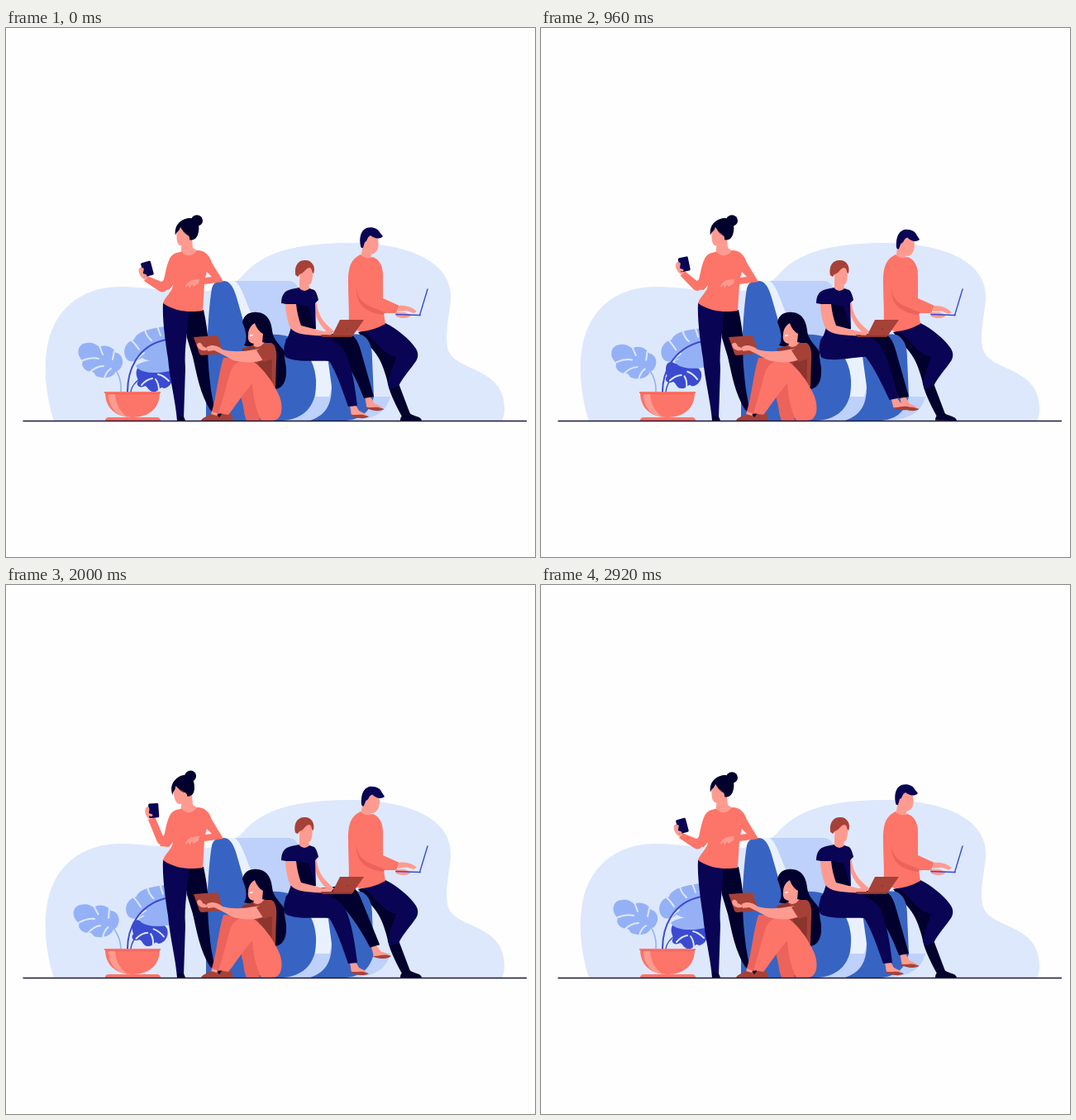
Write an HTML page with a canvas that moves like this. It is 640 by 640 pixels and loops after 2960 ms.

```html
<!DOCTYPE html>
<html lang="en">
<head>
<meta charset="utf-8">
<title>Friends with devices</title>
<style>
html, body { margin: 0; width: 100%; height: 100%; overflow: hidden; background: #fefefe; }
canvas { display: block; width: 100vw; height: 100vh; }
</style>
</head>
<body>
<canvas id="stage" width="640" height="640"></canvas>
<script>
const ctx = document.getElementById('stage').getContext('2d');
const LOOP = 2960, STEP = 40;
const C = {
  sky: '#dde8fc', pale: '#bdd1fa', mist: '#eaf1fe', blue: '#3764c2', leaf: '#95b1f6', vine: '#3b4bd0',
  navy: '#090453', dark: '#02002c', coral: '#fd7468', deep: '#ec635b', skin: '#fe9b90',
  brown: '#a64138', shade: '#8c352f', line: '#1a1638'
};

function fill(color, d) {
  ctx.fillStyle = color;
  ctx.fill(new Path2D(d));
}
function stroke(color, width, d) {
  ctx.strokeStyle = color;
  ctx.lineWidth = width;
  ctx.stroke(new Path2D(d));
}
function oval(color, x, y, rx, ry, deg = 0) {
  ctx.fillStyle = color;
  ctx.beginPath();
  ctx.ellipse(x, y, rx, ry, deg * Math.PI / 180, 0, 7);
  ctx.fill();
}
function turn(x, y, deg, draw) {
  ctx.save();
  ctx.translate(x, y);
  ctx.rotate(deg * Math.PI / 180);
  ctx.translate(-x, -y);
  draw();
  ctx.restore();
}
const mix = (a, b, p) => a + (b - a) * p;

// Eased value along [time, value] pairs
function track(t, keys) {
  for (let i = 1; i < keys.length; i++) {
    const [t0, a] = keys[i - 1], [t1, b] = keys[i];
    if (t <= t1) {
      const u = Math.max(0, (t - t0) / (t1 - t0));
      return mix(a, b, u * u * (3 - 2 * u));
    }
  }
  return keys[keys.length - 1][1];
}
// Single swing up and back between two times
function swing(t, from, to, power = 1) {
  const u = (t - from) / (to - from);
  return u <= 0 || u >= 1 ? 0 : Math.pow((1 - Math.cos(u * 2 * Math.PI)) / 2, power);
}

function backdrop() {
  fill('#fefefe', 'M0 0H640V640H0Z');
  fill(C.sky, 'M58 475C48 445 46 412 49 392C55 340 92 313 139 313C175 313 212 322 244 318C262 316 275 310 285 301C310 270 352 261 412 260C482 259 541 281 538 328C537 345 530 370 535 390C545 416 603 410 603 460C603 467 602 471 600 475Z');
}

function plant(t) {
  const side = swing(t, 700, 2450);
  const up = track(t, [[250, 0], [1150, 1], [1800, 1], [2500, 0]]);
  const drop = track(t, [[200, 0], [600, .42], [1250, 1], [1600, 1], [2000, .6], [2540, 0]]);

  turn(140, 440, -14 * side, () => {
    stroke(C.leaf, 1.6, 'M139 440C140 428 136 416 127 406');
    fill(C.leaf, 'M89 398C85 390 89 381 98 381C105 380 109 383 113 386C122 382 130 387 133 393C139 394 142 400 141 406C139 412 137 415 133 415C131 422 121 425 112 422C106 421 109 417 104 416C98 416 93 412 92 407C94 402 91 402 89 398Z');
    stroke(C.sky, 2, 'M93 402Q103 398 112 400M101 417Q109 409 118 409M119 424Q121 416 127 412M113 384L117 395M131 391L129 401');
  });

  turn(150, 440, 3 * up, () => {
    fill(C.leaf, 'M145 399C140 389 146 379 155 377C158 367 174 364 192 361L202 402C184 405 173 404 164 399C157 405 148 405 145 399Z');
    stroke(C.sky, 2, 'M152 378Q157 383 161 389M168 364Q169 372 176 378M183 361L187 372M156 404Q161 397 167 393');
  });

  stroke(C.vine, 2, `M147 440C147 ${mix(415, 420, drop)} 158 ${mix(384, 390, drop)} 194 ${mix(377, 380, drop)}`);
  stroke(C.vine, 1.5, `M151 440Q152 431 ${mix(164, 158, drop)} ${mix(423, 420, drop)}`);
  ctx.save();
  ctx.translate(-9 * drop, -7 * drop);
  turn(165, 420, 8 * drop, () => {
    fill(C.vine, 'M158 421C156 411 162 407 168 411C176 408 196 409 200 417C204 425 199 435 191 436C186 432 186 440 179 440C173 441 172 434 168 433C162 437 156 432 160 427Z');
    stroke(C.sky, 2, 'M164 432Q170 425 177 424M185 439Q185 430 181 425M197 427Q190 420 184 419');
  });
  ctx.translate(15 * drop, 0);
  fill(C.leaf, 'M157 409C163 403 180 400 202 403L198 415C185 418 163 419 157 409Z');
  ctx.restore();

  fill(C.coral, 'M120 441H186C186 459 174 471 153 471C132 471 120 459 120 441Z');
  fill(C.skin, 'M124 443H132C133 456 139 466 148 471C133 469 124 458 124 443Z');
  fill(C.coral, 'M119 440H187V442H119ZM120 475C120 472 122 471 125 471H182C185 471 187 472 187 475Z');
  fill(C.deep, 'M121 442H186V443H121Z');
}

function chairBack() {
  fill(C.pale, 'M268 306H341C350 306 353 312 356 322L362 390H290Z');
  fill(C.mist, 'M266 306H276C284 309 289 328 297 346L293 390H280Z');
  fill(C.blue, 'M242 475C242 420 243 350 249 315C251 308 255 306 263 306C271 306 275 313 279 326L293 375L300 475Z');
}

function chairSeat() {
  fill(C.pale, 'M345 380H430L443 446H465C461 461 451 473 420 475H320V390Z');
  fill(C.blue, 'M310 372C330 369 350 371 368 390C376 402 376 430 374 443C370 463 355 474 333 475H275V420Z');
  fill(C.mist, 'M366 397H392C395 420 395 437 391 446H374C377 430 375 410 366 397Z');
  fill(C.blue, 'M388 390C391 375 420 367 432 372C441 378 443 388 443 400L445 446C440 466 428 474 410 475H368C388 468 394 454 394 434Z');
}

function phoneArm(p) {
  const at = (a, b) => `${mix(a[0], b[0], p)} ${mix(a[1], b[1], p)}`;
  fill(C.coral, `M${at([199, 300], [199, 296])}L${at([188, 307], [190, 304])}L${at([171, 300], [180, 280])}L${at([167, 306], [172, 284])}L${at([185, 318], [183, 311])}Q${at([191, 322], [188, 318])} ${at([195, 316], [196, 311])}Z`);
  const x = mix(165, 172, p), y = mix(296, 275, p);
  oval(C.skin, x + 1, y + 1, 4.3, 8, mix(-30, -18, p));
  turn(mix(171, 178.5, p), mix(291, 273, p), mix(-15, -4, p), () => {
    ctx.fillStyle = C.navy;
    ctx.beginPath();
    ctx.roundRect(mix(164.7, 172.6, p), mix(282.7, 264.2, p), 12.2, 17.4, 1.6);
    ctx.fill();
  });
  oval(C.skin, x - .5, y - 2, 1.8, 4.2, mix(15, 8, p));
  oval(C.skin, x + 2, y + 3, 3.6, 1.6, 15);
}

function standingWoman(t) {
  const nod = track(t, [[980, 0], [1340, 1], [2600, 1], [2860, 0]]);
  const lift = track(t, [[800, 0], [1240, 1], [2080, 1], [2540, 0]]);

  fill(C.dark, 'M217 341L239 341C242 355 244 368 245 382C243 398 246 420 248 438L253 466L247 462C235 443 231 420 226 398L219 375Z');
  fill(C.navy, 'M190 332L221 341C221 365 215 385 217 412L215 472L216 475H207C205 450 198 425 196 400C192 375 189 350 190 332Z');
  fill(C.dark, 'M207 470H215L217 475H207Z');

  fill(C.skin, 'M213 257L225 254L226 266L232 270L224 278L211 275Z');
  fill(C.coral, 'M213 271C217 277 226 277 231 269C241 269 246 275 249 284L263 307L240 310L238 342C224 344 206 344 190 333C192 325 201 320 202 311L197 317L186 316C193 306 192 291 198 279C201 273 207 271 213 271Z');
  fill(C.mist, 'M243 295L249 301L241 302Z');
  phoneArm(lift);
  fill(C.skin, 'M234 304C224 304 218 307 217 314L221 311L222 315L225 310L227 313L233 309Z');

  turn(219, 268, -12.5 * nod, () => {
    fill(C.skin, 'M207 243C206 253 206 260 210 263C214 264 218 262 223 257L226 250L217 241Z');
    fill(C.dark, 'M205 251C203 238 212 231 221 230C230 229 235 237 233 246C232 254 227 258 222 256C223 250 216 249 211 241C209 247 206 246 205 251Z');
    oval(C.dark, 231, 233, 7, 6.7);
    stroke(C.dark, .8, 'M214 245Q218 252 225 251');
  });
}

function man(t) {
  const bow = track(t, [[320, 0], [920, 1], [2120, 1], [2480, 0]]);
  const tap = Math.sin(t / LOOP * Math.PI * 14);
  const heel = swing(t, 300, 1100);

  fill(C.dark, 'M426 368L453 362L474 397L475 430L489 467L479 470C469 452 463 438 461 426C457 411 453 401 446 392Z');
  fill(C.navy, 'M432 367L459 357C473 364 488 376 496 388C499 393 499 398 496 403C490 412 482 420 475 433L464 437L462 430C464 418 469 408 472 398C456 395 452 382 432 367Z');
  turn(498, 474, 2.5 * heel, () => fill(C.dark, 'M477 475C477 470 480 467 487 465C491 470 502 469 503 475Z'));

  fill(C.skin, 'M432 262L443 271L441 279L429 278Z');
  fill(C.coral, 'M429 274C433 279 439 279 443 277C451 279 456 287 456 299L456 327L476 336L472 345L457 345L459 358C448 364 437 367 428 367L414 362C416 348 414 330 414 308C414 289 417 280 429 274Z');
  fill(C.deep, 'M424 314C425 328 432 334 446 339L458 344L457 347C440 345 423 338 424 314Z');

  turn(437, 275, 6 * bow, () => {
    ctx.translate(0, 2 * bow);
    fill(C.skin, 'M433 256L440 249L449 252C452 261 451 270 445 273C441 274 437 272 433 269Z');
    fill(C.navy, 'M429 264C427 254 429 245 436 242C444 240 450 243 452 247L456 252C452 256 446 255 441 251C436 253 438 258 434 259L432 266L430 266Z');
  });

  fill(C.skin, 'M471 344L482 344L490 347C488 352 478 352 472 349Z');
  stroke(C.vine, 1.7, 'M472 346.5L501 347.5');
  stroke(C.vine, 1.4, 'M500.5 347.5L510 316');
  turn(475, 340, 3 * tap, () =>
    fill(C.skin, 'M475 336C484 335 492 338 497 343L493 345L485 342L474 343Z'));
}

function leg(hipX, hipY, deg, dx, dy, color, d) {
  turn(hipX, hipY, -deg, () => {
    fill(C.skin, `M${416 + dx} ${456 + dy}H${423 + dx}L${427 + dx} ${463 + dy}L${437 + dx} ${468 + dy}L${418 + dx} ${469 + dy}Z`);
    fill(C.brown, `M${415 + dx} ${467 + dy}C${423 + dx} ${470 + dy} ${428 + dx} ${465 + dy} ${439 + dx} ${470 + dy}C${434 + dx} ${474 + dy} ${421 + dx} ${472 + dy} ${415 + dx} ${467 + dy}Z`);
    fill(color, d);
  });
}

function laptopWoman(t) {
  const left = swing(t, 170, 2010, .9), right = swing(t, 1220, LOOP, .85);
  const tilt = track(t, [[0, .2], [600, -1], [1400, 1], [1640, 1], [2050, -.3], [2500, -1], [2920, .2], [2960, .2]]);

  leg(352, 376, 6.5 * right, 18.5, -9, C.dark,
    'M365 370L415 370C424 373 427 382 430 393L445 446L433 448C424 425 416 410 405 394L350 394Z');
  leg(345, 385, 6.6 * left, 0, 0, C.navy,
    'M345 370C337 377 334 389 338 398C350 405 375 402 391 403C400 417 407 438 414 458L425 457C422 432 418 408 411 393C406 381 390 374 370 371Z');

  fill(C.skin, 'M372 331L376 333C377 345 382 355 397 367L393 371C380 362 373 350 372 331Z');
  fill(C.navy, 'M345 316L355 314Q361 320 367 315L373 317C376 320 377 325 378 329L374 333L375 364L354 373L341 374C347 360 348 347 345 335L333 333C333 323 337 318 345 316Z');
  fill(C.dark, 'M351 334L366 337L374 364L357 361Z');
  fill(C.navy, 'M338 378C343 369 360 370 379 371L396 376L350 390Z');
  fill(C.skin, 'M338 334H351C352 344 354 352 357 360L384 367L395 369L392 373L374 372C358 371 347 369 343 361C340 352 338 343 338 334Z');
  fill(C.skin, 'M355 303L366 309L367 315Q361 321 355 315Z');

  turn(364, 315, 3.2 * tilt, () => {
    fill(C.skin, 'M354 294L369 287C372 294 371 304 369 309C365 313 359 311 356 306Z');
    fill(C.brown, 'M350 299C348 287 354 281 361 281C369 280 375 288 372 297C369 296 371 291 367 290C361 291 362 296 355 298L353 301Z');
  });

  fill(C.brown, 'M404 353H433L419 373H382L381 371L395 371Z');
  fill(C.shade, 'M382 372H420L418 374H383Z');
  oval(C.skin, 389, 369 + .7 * Math.sin(t / LOOP * Math.PI * 14), 5.5, 2, 8);
  oval(C.shade, 413, 364, 1, 1);
}

function sittingGirl() {
  fill(C.dark, 'M286 356C288 346 296 343 304 344C317 345 321 356 322 366C323 378 333 384 337 392C336 401 340 409 339 417C339 428 334 436 326 437L304 388L288 384C293 376 290 366 286 356Z');
  fill(C.skin, 'M293 371C293 364 297 359 301 357C303 363 307 368 311 370L310 380L318 382L311 390L297 388L300 382C294 381 292 377 293 371Z');
  fill(C.brown, 'M286 388L299 384Q306 389 312 381L321 381C326 383 328 391 327 403L326 434L318 438L301 410L290 399Z');
  fill(C.shade, 'M285 388L299 384L304 391L289 398ZM304 404L322 401C322 416 321 425 322 435L318 434Z');
  oval('#fff', 297, 372, 2, 1, -12);

  fill(C.brown, 'M236 475C238 470 246 470 251 464L273 467L275 475Z');
  fill(C.dark, 'M254 465L262 466L258 471Z');
  fill(C.skin, 'M251 460L258 463L255 469L248 467Z');
  fill(C.deep, 'M263 399L291 400L288 430L258 467L249 464C255 443 257 418 263 399Z');
  fill(C.deep, 'M287 402L320 425L321 471L291 474L284 445Z');
  fill(C.coral, 'M272 414C279 400 293 400 300 404C311 412 324 429 331 446C336 460 334 475 322 475H309C302 462 299 446 298 430C285 445 275 461 269 468L257 466C263 448 267 430 272 414Z');
  fill(C.deep, 'M289 440C292 452 299 466 308 475H291C286 463 287 450 289 440Z');

  fill(C.brown, 'M227 374L254 372Q256 372 257 374L263 394L237 396Q235 396 234 394Z');
  fill(C.skin, 'M231 383C233 379 237 381 238 385L245 388C242 392 232 391 231 383Z');
  fill(C.skin, 'M243 386C250 382 257 385 262 389C273 392 286 392 300 389L311 388L315 400C302 406 287 405 275 402L262 395L252 390L244 391Z');
  fill(C.brown, 'M303 390L314 385L326 387L324 399L312 404Z');
}

function render(t) {
  ctx.lineCap = 'round';
  backdrop();
  plant(t);
  chairBack();
  standingWoman(t);
  man(t);
  chairSeat();
  laptopWoman(t);
  sittingGirl();
  stroke(C.line, 1.4, 'M21 475.5H629.5');
}

const start = performance.now();
function tick() {
  const t = (performance.now() - start) % LOOP;
  render(Math.floor(t / STEP) * STEP);
  requestAnimationFrame(tick);
}
tick();
</script>
</body>
</html>
```
